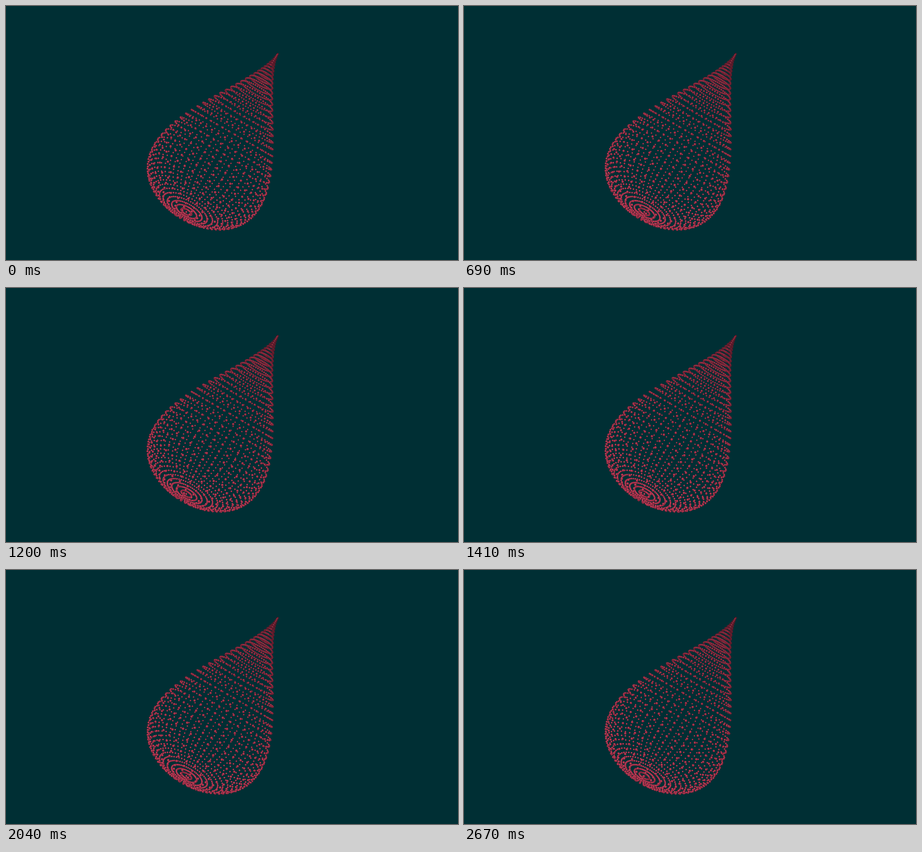
These frames come from a looping animation (960 px wide and 540 px high, 2700 ms). An HTML page with a canvas:

```html
<!DOCTYPE html>
<html lang="en">
<head>
<meta charset="utf-8">
<title>Rotating drop</title>
<style>
  html, body { margin: 0; width: 100%; height: 100%; overflow: hidden; background: #002f34; }
  canvas { display: block; width: 960px; height: 540px; }
</style>
</head>
<body>
<canvas id="stage" width="960" height="540"></canvas>
<script>
const ctx = document.getElementById('stage').getContext('2d');
const LOOP = 2700, STEP = 30;
const RINGS = 50, PER_RING = 50;
const SIZE = 194, DOT = 2.1;
const CAMERA = 270 / Math.tan(Math.PI / 6);   // 60 degree field of view
const LEAN = Math.PI / 6;
const SIN = Math.sin(LEAN), COS = Math.cos(LEAN);
const SHADES = 12, SPRITE = 32;

function makeSphere(light) {
  const sphere = document.createElement('canvas');
  sphere.width = sphere.height = SPRITE;
  const c = sphere.getContext('2d');
  const tone = (r, g, b) => `rgb(${[r, g, b].map(v => Math.round(v * light)).join()})`;
  const g = c.createRadialGradient(13, 10, 1, 16, 16, 16);
  g.addColorStop(0, tone(206, 74, 100));
  g.addColorStop(0.5, tone(178, 54, 80));
  g.addColorStop(1, tone(104, 32, 50));
  c.fillStyle = g;
  c.arc(16, 16, 16, 0, 2 * Math.PI);
  c.fill();
  return sphere;
}

const spheres = Array.from({ length: SHADES }, (_, i) => makeSphere(0.74 + 0.28 * i / (SHADES - 1)));

// Rings around a leaning axis, seen in perspective from level with the middle.
function dropPoints(turn) {
  const points = [];
  for (let i = 0; i <= RINGS; i++) {
    const t = Math.PI * i / RINGS;
    const along = -SIZE * Math.cos(t);
    const radius = SIZE * Math.sin(t) * (1 - Math.cos(t)) / 2;
    const shade = Math.round((1 - Math.cos(t)) / 2 * (SHADES - 1));
    for (let j = 0; j < PER_RING; j++) {
      const angle = 2 * Math.PI * (j / PER_RING - turn);
      const across = radius * Math.cos(angle);
      const depth = radius * Math.sin(angle);
      const scale = CAMERA / (CAMERA - depth);
      points.push({
        x: 480 + scale * (across * COS - along * SIN),
        y: 270 + scale * (across * SIN + along * COS),
        r: DOT * scale,
        depth, shade
      });
    }
  }
  return points.sort((a, b) => a.depth - b.depth);
}

function draw(time) {
  const turn = Math.floor(time % LOOP / STEP) * STEP / LOOP;
  ctx.fillStyle = '#002f34';
  ctx.fillRect(0, 0, 960, 540);
  for (const { x, y, r, shade } of dropPoints(turn)) {
    ctx.drawImage(spheres[shade], x - r, y - r, 2 * r, 2 * r);
  }
}

const start = performance.now();
function frame() {
  draw(performance.now() - start);
  requestAnimationFrame(frame);
}
frame();
</script>
</body>
</html>
```
